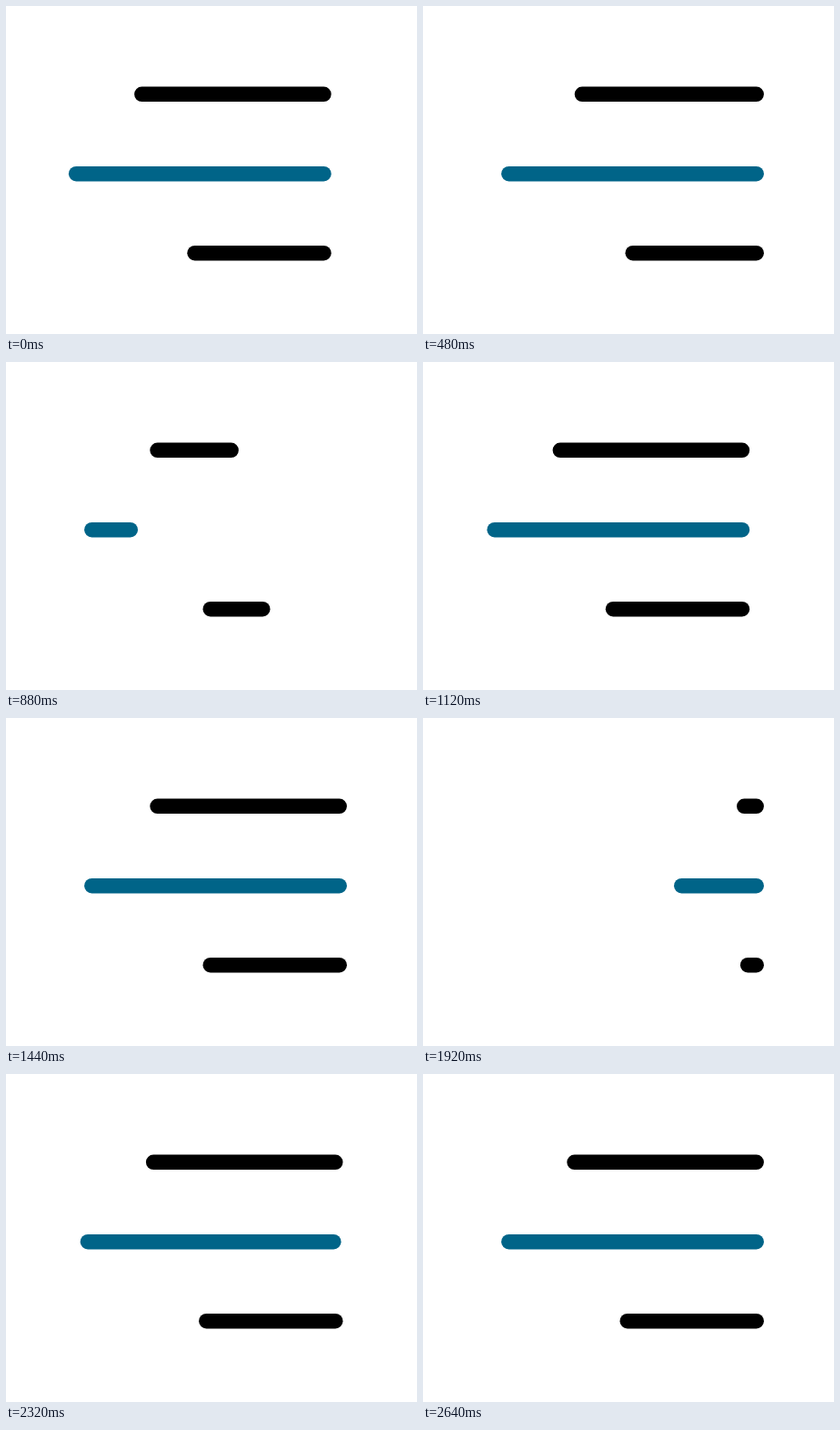
These frames come from a looping animation (452x360 px, 2800 ms). An HTML page:

```html
<!DOCTYPE html>
<html lang="en">
<head>
<meta charset="utf-8">
<title>Menu bars</title>
<style>
  html, body { margin: 0; width: 100%; height: 100%; overflow: hidden; background: #fff; }
  svg { display: block; width: 100%; height: 100%; }
  line { stroke: #000; stroke-width: 16.6; stroke-linecap: round; }
  .accent { stroke: #006488; }
</style>
</head>
<body>
<svg viewBox="0 0 452 360">
  <line/>
  <line class="accent"/>
  <line/>
</svg>
<script>
const LOOP = 2800, STEP = 80, TICK = 40;
const CYCLE = 31, FIRST = 10;   // in ticks
const RIGHT = 366.6, SWEEP = 7.9;

// out/in: ticks at which a bar starts to wipe away and to grow back
const bars = [
  { left: 166.6, y: 96.8, out: 0.7, in: 8.43 },
  { left: 94.4, y: 184.2, out: 2.23, in: 9.66 },
  { left: 224.8, y: 271.2, out: 0.7, in: 8.43 }
];
const lines = document.querySelectorAll('line');

// Sideways nudge per tick, beginning when the outer bars are whole again
const NUDGE_START = 16;
const nudge = [0, -4.4, -15.7, -28, -28, -17.2, -8, -3, -0.8];

// cubic-bezier(.5, 0, .5, 1)
function ease(x) {
  if (x <= 0) return 0;
  if (x >= 1) return 1;
  let lo = 0, hi = 1;
  for (let i = 0; i < 24; i++) {
    const s = (lo + hi) / 2;
    if (1.5 * s * (1 - s) + s ** 3 < x) lo = s; else hi = s;
  }
  return lo * lo * (3 - 2 * lo);
}

function draw(time) {
  const stepped = Math.floor((time % LOOP) / STEP) * STEP;
  const tick = (stepped / TICK - FIRST + CYCLE) % CYCLE;
  const dx = nudge[tick - NUDGE_START] || 0;

  bars.forEach((bar, i) => {
    const gone = ease((tick - bar.out) / SWEEP);
    const back = ease((tick - bar.in) / SWEEP);
    const growing = tick > bar.in;
    const span = RIGHT - bar.left;
    const from = growing ? bar.left : bar.left + span * gone;
    const to = growing ? bar.left + span * back : RIGHT;
    const line = lines[i];
    line.setAttribute('x1', from + dx);
    line.setAttribute('x2', to + dx);
    line.setAttribute('y1', bar.y);
    line.setAttribute('y2', bar.y);
    line.style.visibility = to - from > 0.8 ? 'visible' : 'hidden';
  });
}

const start = performance.now();
function loop() {
  draw(performance.now() - start);
  requestAnimationFrame(loop);
}
loop();
</script>
</body>
</html>
```
